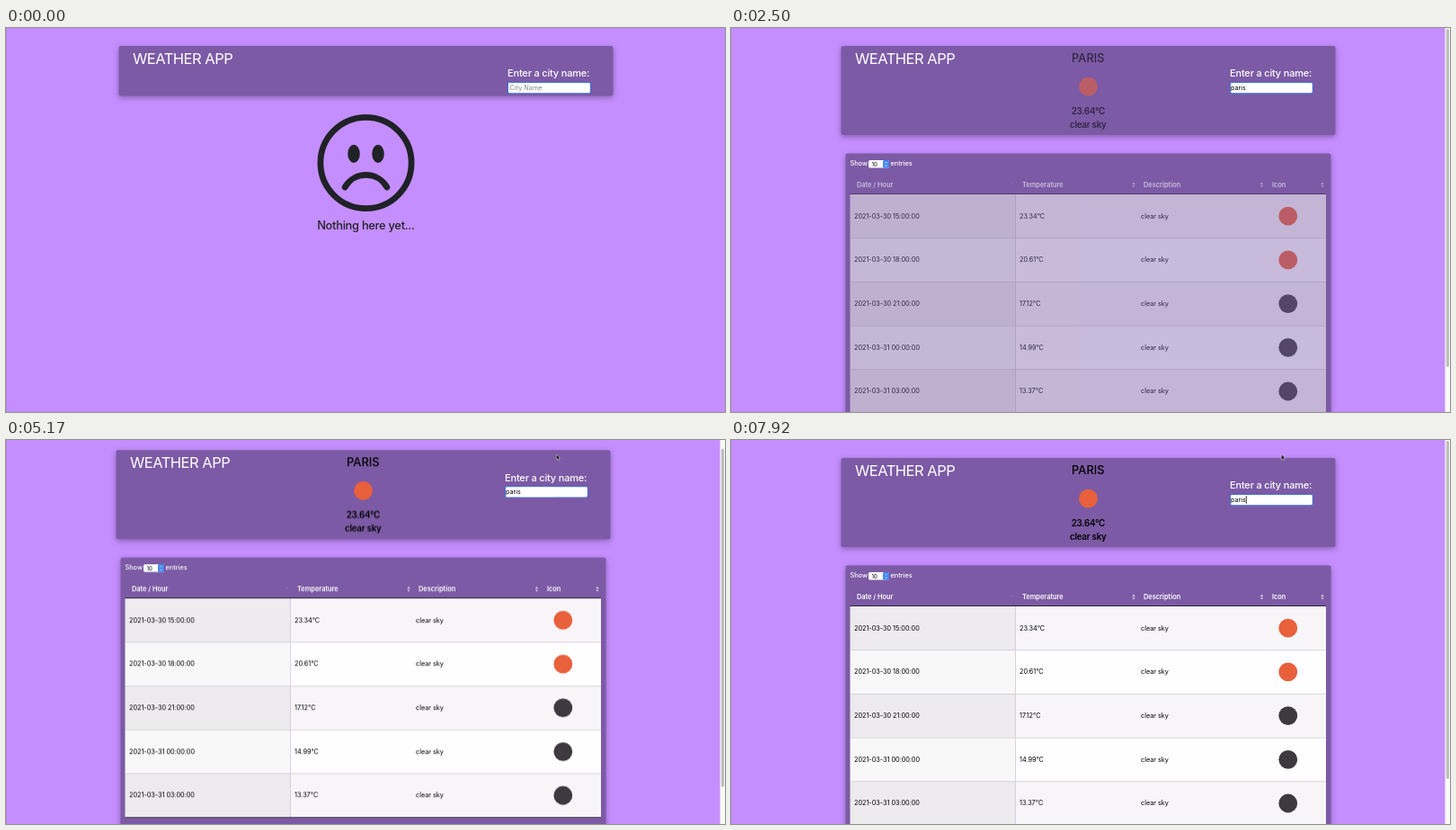
An HTML page that plays this animation: 800 px wide and 427 px high, repeating every 8000 ms.

```html
<!DOCTYPE html>
<html lang="en">
<head>
<meta charset="utf-8">
<title>Weather app</title>
<style>
  html, body { margin: 0; width: 100%; height: 100%; overflow: hidden; background: #c58eff; }
  svg { display: block; width: 100%; height: 100%; font: 7.3px Inter, "Open Sans", sans-serif; }
  text { white-space: pre; }
  .card { fill: #7c5aa5; filter: drop-shadow(0 2px 3px rgba(0, 0, 0, .32)); }
  .white { fill: #fff; }
  .medium { font-weight: 500; }
  .title { font-size: 16.5px; letter-spacing: -.5px; }
  .label { font-size: 11px; font-weight: 500; letter-spacing: -.18px; }
  .mid { text-anchor: middle; }
  .city { font-size: 12.8px; font-weight: 500; }
  .now { font-size: 9.8px; font-weight: 600; letter-spacing: -.25px; }
  .caption { font-size: 12.8px; font-weight: 500; letter-spacing: -.25px; }
  .head { font-size: 7.4px; font-weight: 600; fill: #fff; }
  .cell { letter-spacing: -.03px; }

  .scroll, .header, .bar, .face, .result, .reading, .sun, .listing,
  .table, .typing, .hint, .pointer { animation: 8s step-end infinite; }
  .scroll { animation-name: scroll; }
  .header { animation-name: narrow; }
  .bar { animation-name: grow; }
  .face { animation-name: push; }
  .result { animation-name: result; }
  .reading { animation-name: reading; }
  .sun, .listing { animation-name: arrive; }
  .table { animation-name: fade; }
  .typing { animation-name: type; }
  .hint { animation-name: hint; }
  .pointer { animation-name: point; }
  .caret { animation: blink 1s step-end infinite; }

  /* 1% is 80 ms */
  @keyframes grow { 0% { height: 55.5px } 27.1% { height: 68.5px } 29.1% { height: 99px } }
  @keyframes narrow { 0% { transform: none } 29.1% { transform: translateX(-3px) } }
  @keyframes push {
    0% { transform: none; opacity: 1 }
    27.1% { transform: translateY(13px); opacity: 1 }
    29.1% { opacity: 0 }
    100% { opacity: 0 }
  }
  @keyframes result {
    0% { opacity: 0 }
    27.1% { opacity: 1 }
    29.1% { opacity: 0; animation-timing-function: ease }
    35.4%, 100% { opacity: 1 }
  }
  @keyframes reading { 0% { transform: none } 29.1% { transform: translateY(30.5px) } }
  @keyframes arrive { 0% { opacity: 0 } 29.1%, 100% { opacity: 1 } }
  @keyframes fade {
    0% { opacity: 0 }
    29.1% { opacity: 0; animation-timing-function: ease }
    35.4%, 100% { opacity: 1 }
  }
  @keyframes hint { 0% { opacity: 1 } 9.3% { opacity: 0 } 100% { opacity: 0 } }
  @keyframes type {
    0% { transform: none }
    9.3% { transform: translateX(4.4px) }
    11.4% { transform: translateX(8.4px) }
    13.5% { transform: translateX(11.1px) }
    15.6% { transform: translateX(12.8px) }
    17.7% { transform: translateX(16.8px) }
  }
  @keyframes blink { 0% { opacity: 0 } 55%, 100% { opacity: 1 } }
  @keyframes point {
    0% { transform: translateY(-26px) }
    57.2% { transform: translateY(-26px); animation-timing-function: ease-out }
    60.4%, 100% { transform: none }
  }
  @keyframes scroll {
    0% { transform: none }
    63.4% { transform: translateY(-2px) }
    64.6% { transform: translateY(-8.8px) }
    65.6% { transform: translateY(-19px) }
    66.6% { transform: translateY(-28px) }
    67.7% { transform: translateY(-36px) }
    68.7% { transform: translateY(-42px) }
    69.7% { transform: translateY(-46px) }
    71% { transform: translateY(-49px) }
    80.2% { transform: translateY(-47px) }
    81.2% { transform: translateY(-43px) }
    82.2% { transform: translateY(-35px) }
    83.3%, 100% { transform: none }
  }
</style>
</head>
<body>
<svg viewBox="0 0 800 427" preserveAspectRatio="none">
  <rect width="800" height="427" fill="#c58eff"/>
  <rect width="1" height="427" fill="#b68aea"/>

  <g class="scroll">
    <g class="header">
      <rect class="card bar" x="125.5" y="20" width="550" height="55.5" rx="2"/>
      <text class="white title" x="141" y="39.6">WEATHER APP</text>
      <text class="white label" x="558" y="54.4">Enter a city name:</text>
      <rect x="558.4" y="60.4" width="92" height="12.4" rx="2" fill="#fff" stroke="#4a6fd0" stroke-width="1.2"/>
      <text x="559" y="69.2" font-size="7.2">paris</text>
      <g class="typing">
        <rect class="white" x="559" y="61.5" width="40" height="10"/>
        <rect class="caret" x="559" y="62.2" width=".8" height="8.6"/>
      </g>
      <text class="hint" x="560.5" y="69.2" fill="#858585">City Name</text>
      <g class="result mid">
        <text class="city" x="400.3" y="38">PARIS</text>
        <circle class="sun" cx="400.5" cy="65.2" r="10.4" fill="#e8603c"/>
        <g class="reading now">
          <text x="400.3" y="65">23.64°C</text>
          <text x="400.3" y="80">clear sky</text>
        </g>
      </g>
    </g>

    <g class="face" fill="#1f2226">
      <g fill="none" stroke="#1f2226" stroke-width="6.75" stroke-linecap="round">
        <circle cx="400.5" cy="150" r="50.6"/>
        <path d="M377.1 177a27 27 0 0 1 46.8 0"/>
      </g>
      <ellipse cx="387" cy="139.9" rx="6.75" ry="10.1"/>
      <ellipse cx="414" cy="139.9" rx="6.75" ry="10.1"/>
      <text class="caption mid" x="400.4" y="223.6">Nothing here yet...</text>
    </g>

    <g class="listing">
      <rect class="card" x="127.5" y="139.5" width="540" height="315.5" rx="2"/>
      <g class="white medium">
        <text x="132.5" y="153">Show</text>
        <text x="177.5" y="153">entries</text>
        <text x="132.5" y="443">Showing 1 to 5 of 40 entries</text>
      </g>
      <rect class="white" x="153" y="147" width="23" height="8.6" rx="1.5"/>
      <rect x="169" y="147" width="7" height="8.6" rx="1.5" fill="#3b82ee"/>
      <path d="M171 150.5l1.5-1.7 1.5 1.7M171 152.2l1.5 1.7 1.5-1.7" fill="none" stroke="#fff" stroke-width=".7"/>
      <text x="156.5" y="153.5" font-size="6">10</text>
      <text x="592" y="443" fill="#5b4a70">Previous</text>
      <text x="638" y="443" fill="#222">Next</text>
      <g class="table" id="table"></g>
    </g>
  </g>

  <g class="listing">
    <rect x="794.5" width="5.5" height="427" fill="#fafafa"/>
    <!-- flipped, so the thumb runs against the page -->
    <g transform="matrix(1 0 0 -1 0 377)">
      <rect class="scroll" x="795.8" y="0" width="3.2" height="376" rx="1.6" fill="#bdbdbd"/>
    </g>
  </g>
  <path class="pointer" d="M612.4 16v6l1.4-1.2 1 2 1-.5-1-1.9h1.9z" fill="#111" stroke="#fff" stroke-width=".4"/>
</svg>

<script>
  const ROW = 48.7, TOP = 185, LEFT = 132.5, RIGHT = 662, SPLIT = 316.5;
  const rect = (x, y, w, h, fill) =>
    `<rect x="${x}" y="${y}" width="${w}" height="${h}" fill="${fill}"/>`;
  const text = (kind, x, y, words) => `<text class="${kind}" x="${x}" y="${y}">${words}</text>`;

  const heads = [["Date / Hour", 140], ["Temperature", 324, 448], ["Description", 459, 590.5], ["Icon", 602, 658]];
  const rows = [
    ["2021-03-30 15:00:00", "23.34"],
    ["2021-03-30 18:00:00", "20.61"],
    ["2021-03-30 21:00:00", "17.12"],
    ["2021-03-31 00:00:00", "14.99"],
    ["2021-03-31 03:00:00", "13.37"]
  ];

  const sorter = x =>
    `<path d="M${x - 1.7} 174l1.7-2.4 1.7 2.4zm0 1.2l1.7 2.4 1.7-2.4z" fill="#d8cfe4"/>`;
  const headRow = heads.map(([name, x, mark]) =>
    text("head", x, 177.2, name) + (mark ? sorter(mark) : "")).join("");

  const bodyRow = ([date, degrees], i) => {
    const y = TOP + i * ROW, base = y + 26.6, odd = i % 2 === 0;
    return rect(LEFT, y, SPLIT - LEFT, ROW, odd ? "#edebee" : "#f8f8f8")
      + rect(SPLIT, y, RIGHT - SPLIT, ROW, odd ? "#f7f5f8" : "#fefdff")
      + (i ? rect(LEFT, y - .3, RIGHT - LEFT, .7, "#d9d7db") : "")
      + text("cell", 137, base, date)
      + text("cell", 321, base, degrees + "°C")
      + text("cell", 456, base, "clear sky")
      + `<circle cx="619.8" cy="${y + 24.2}" r="10.4" fill="${i < 2 ? "#e8603c" : "#3c3a3e"}"/>`;
  };

  document.getElementById("table").innerHTML = headRow
    + rect(312.3, 172.5, 1.2, 1.2, "#9c83bd")
    + rows.map(bodyRow).join("")
    + rect(LEFT, TOP - .8, RIGHT - LEFT, .8, "#1c1624")
    + rect(LEFT, TOP + 5 * ROW - .4, RIGHT - LEFT, .8, "#1c1624");
</script>
</body>
</html>
```
